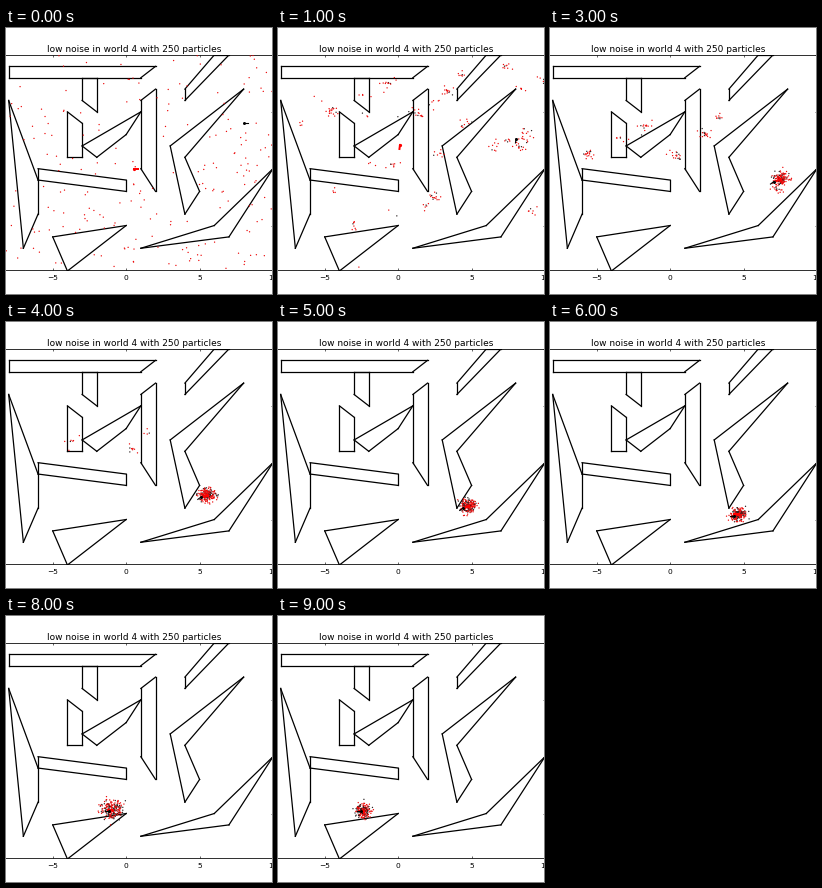
Recreate the animation shown at these times as a matplotlib script. Size 266 px wide and 266 px high, loop 9.5 s.

```python
import numpy as np
import matplotlib.pyplot as plt
from matplotlib.animation import FuncAnimation
from matplotlib.path import Path

STEPS, INTERVAL = 19, 500
SIZE, DPI = 266, 100
LEFT, TOP, WIDTH, HEIGHT = -12, 27, 279, 216   # axes box in pixels
LOW, HIGH = -9, 10                             # world limits
PX = 72 / DPI                                  # points per pixel
RED, DARK = (0.93, 0.04, 0.04, 1), (0.16, 0.13, 0.13, 1)

OBSTACLES = [
    [(-8, 9), (2, 9), (1, 8), (-8, 8)],
    [(-3, 8), (-2, 8), (-2, 5), (-3, 6)],
    [(-4, 5), (-3, 4), (-3, 1), (-4, 1)],
    [(-3, 2), (1, 5), (0, 3), (-2, 1)],
    [(1, 6), (2, 7), (2, -2), (1, 0)],
    [(-8, 6), (-6, -1), (-6, -4), (-7, -7)],
    [(-6, 0), (0, -1), (0, -2), (-6, -1)],
    [(-5, -6), (0, -5), (-4, -9)],
    [(1, -7), (6, -5), (10, 0), (7, -6)],
    [(3, 2), (8, 7), (4, 1), (5, -2), (4, -4)],
    [(4, 7), (6, 10), (7, 10), (4, 6)],
]

# Robot waypoints (step, x, y) in pixels and the steps where it turns
ROUTE = np.array([(1, 238, 95), (4, 238, 143), (5, 238, 143), (8, 195, 175),
                  (9, 185, 186), (10, 185, 186), (11, 184, 194),
                  (12, 184, 194), (17, 83, 195)])
TURNS = [1, 5, 11, 12]
HEADINGS = np.radians([0, 98, 143, 110, 180])

# Rival hypotheses: x, y at step 4, peak size, last step
RIVALS = [(243, 151, 24, 7), (183, 78, 14, 8), (168, 96, 28, 9),
          (109, 88, 22, 9), (87, 99, 9, 6), (54, 116, 28, 7),
          (140, 116, 26, 6)]


def travel(step):
    return np.array([np.interp(step, ROUTE[:, 0], ROUTE[:, k]) for k in (1, 2)])


def to_world(p):
    p = np.asarray(p, float)
    span = HIGH - LOW
    return np.column_stack([(p[:, 0] - LEFT) / WIDTH * span + LOW,
                            HIGH - (p[:, 1] - TOP) / HEIGHT * span])


def uniform(seed, n):
    """Random pixel positions outside the obstacles."""
    rng = np.random.default_rng(seed)
    p = rng.uniform((LEFT, TOP), (LEFT + WIDTH, TOP + HEIGHT), (n, 2))
    w = to_world(p)
    inside = np.any([Path(o).contains_points(w) for o in OBSTACLES], axis=0)
    return p[~inside]


def group(seed, center, n, spread):
    return center + np.random.default_rng(seed).normal(size=(int(n), 2)) * spread


def cloud_center(step):
    return travel(step) + (9 - 0.4 * step, -4 + 0.2 * step)


def particles(step):
    if step == 0:
        return uniform(4, 250)
    # The true hypothesis grows and widens on the long drive west
    wide = 3.9 + 0.5 * (step - 12 if 12 < step < 18 else 0)
    size = min(4.5 * step ** 2, 215)
    parts = [group(100 + step, cloud_center(step), size, (wide, 0.85 * wide))]

    # Rivals move along with the robot, grow until step 4, then die out
    moved = travel(step) - travel(4)
    life = min(step / 4, (10 - step) / 6)
    for k, (x, y, n, last) in enumerate(RIVALS):
        if step <= last:
            parts.append(group(k, (x, y) + moved, n * life, (3.6, 2.5)))

    # Scattered weak groups vanish quickly
    weak = uniform(8, 36)[:max(int(40 * 0.6 ** step * step), 0) if step < 6 else 0]
    for k, spot in enumerate(weak):
        parts.append(group(50 + k, spot + travel(step) - travel(2),
                           1 + k * 7 % 9, (3.4, 2.4)))
    return np.concatenate(parts)


def estimate_at(step):
    trust = 1 - np.exp(-(max(step - 2, 0) / 1.6) ** 2)
    prior = np.array([128 - 3 * step, 141 - 12 * step])
    return prior + trust * (cloud_center(step) - prior)


fig = plt.figure(figsize=(SIZE / DPI, SIZE / DPI), dpi=DPI, facecolor="white")
ax = fig.add_axes([LEFT / SIZE, 1 - (TOP + HEIGHT) / SIZE,
                   WIDTH / SIZE, HEIGHT / SIZE])
ax.set(xlim=(LOW, HIGH), ylim=(LOW, HIGH))
ax.spines["bottom"].set_position(("outward", -PX))
ax.set(xticks=[-5, 0, 5, 10], yticks=[-5, 0, 5, 10])
ax.tick_params(direction="in", top=True, right=True, length=2.5 * PX,
               width=0.6 * PX, pad=5 * PX, labelsize=7.5 * PX)
for spine in ax.spines.values():
    spine.set_linewidth(0.8 * PX)
ax.set_title("low noise in world 4 with 250 particles", x=0.501,
             fontsize=9 * PX, pad=3.1 * PX, family="DejaVu Sans")

# Separate edges, so that upright and level ones stay crisp
for shape in OBSTACLES:
    for a, b in zip(shape, shape[1:] + shape[:1]):
        ax.plot(*zip(a, b), color="black", lw=1.25 * PX)

dots = ax.scatter([], [], s=(1.35 * PX) ** 2, linewidths=0, zorder=3)


def arrow(color, lw, size):
    return ax.plot([], [], color=color, lw=lw * PX, marker="o", mew=0,
                   ms=size * PX, markevery=[0], zorder=4)[0]


estimate = arrow("red", 2, 3.2)
robot = arrow("black", 1.1, 3)


def draw(step):
    pts = particles(step)
    share = 0.12 + 0.016 * step if step else 0
    dark = np.arange(len(pts)) * 0.618 % 1 < share
    dots.set_offsets(to_world(pts))
    dots.set_facecolors(np.where(dark[:, None], DARK, RED))

    angle = HEADINGS[np.searchsorted(TURNS, step, side="right")]
    tail = 4 * np.array([np.cos(angle), np.sin(angle)])
    for line, pos in ((robot, travel(step)), (estimate, estimate_at(step))):
        line.set_data(*to_world([pos, pos + tail]).T)
    return dots, estimate, robot


anim = FuncAnimation(fig, draw, frames=STEPS, interval=INTERVAL,
                     init_func=lambda: draw(0), repeat=True, repeat_delay=0)
plt.show()
```
